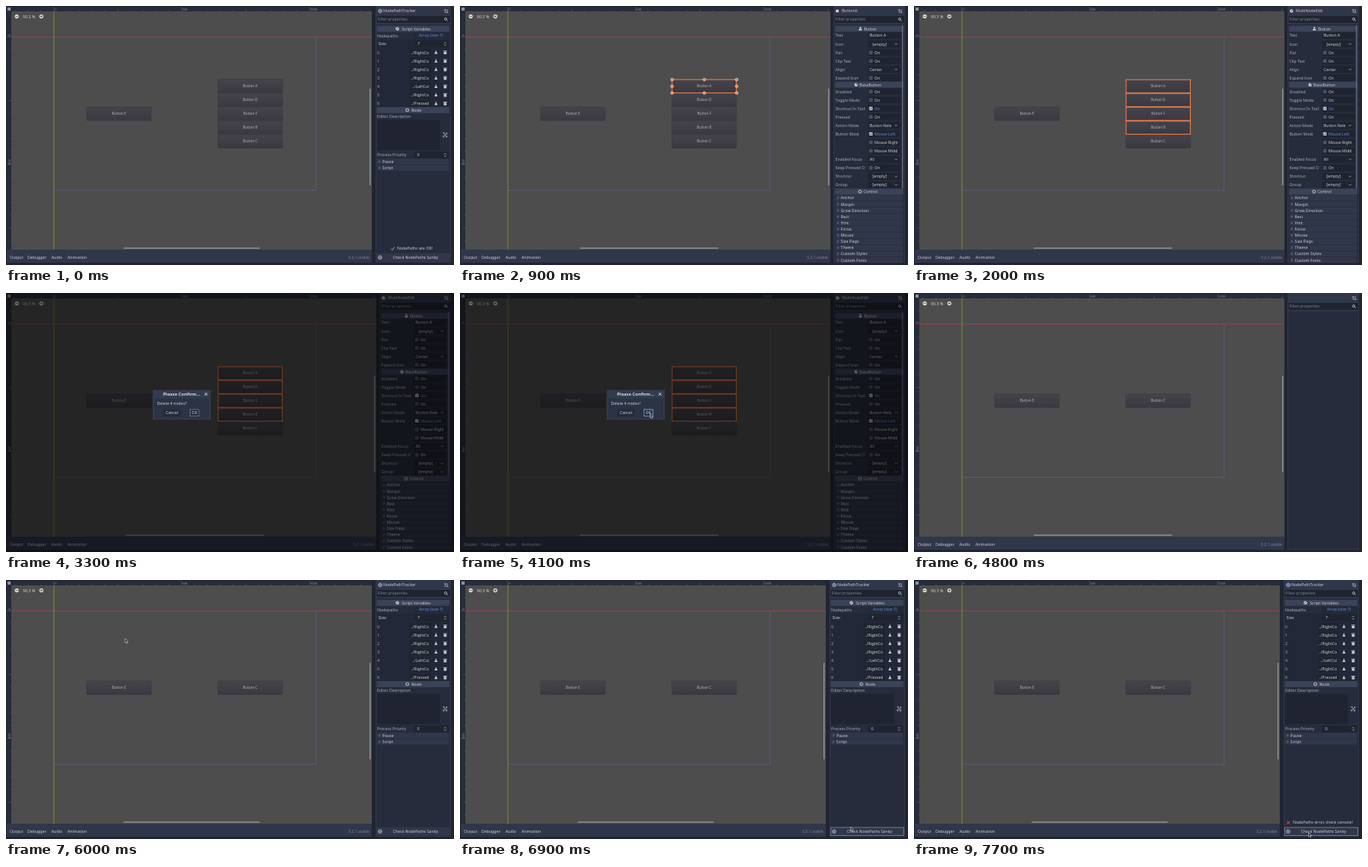
Animation of 583x338 px, one loop 8000 ms. Source, as an HTML page:

```html
<!DOCTYPE html>
<html lang="en">
<head>
<meta charset="utf-8">
<title>Deleting tracked nodes</title>
<style>
html, body { margin: 0; width: 100%; height: 100%; overflow: hidden; background: #202531; }
svg { display: block; width: 583px; height: 338px; }
text { font: 5.2px "Noto Sans", "Open Sans", sans-serif; white-space: pre; }
</style>
</head>
<body>
<svg id="stage" viewBox="0 0 583 338"></svg>
<script>
const BASE = '#30374a', DARK = '#262c3b', DEEP = '#202531', FIELD = '#1f2430';
const FONT = '#c9ccd2', LABEL = '#a9adb6', BLUE = '#5f8fd8', ORANGE = '#f08048';

// Markup helpers; text is placed by its vertical middle.
const rect = (x, y, w, h, fill, extra = '') =>
  `<rect x="${x}" y="${y}" width="${w}" height="${h}" fill="${fill}" ${extra}/>`;
const frame = (x, y, w, h, stroke, width = 1) =>
  rect(x, y, w, h, 'none', `stroke="${stroke}" stroke-width="${width}"`);
const text = (x, y, str, fill = FONT, anchor = 'start', extra = '') =>
  `<text x="${x}" y="${y + 1.9}" fill="${fill}" text-anchor="${anchor}" ${extra}>${str}</text>`;
const line = (d, stroke = FONT, width = 0.8, extra = '') =>
  `<path d="${d}" fill="none" stroke="${stroke}" stroke-width="${width}" ${extra}/>`;
const dot = (x, y, r, fill, extra = '') => `<circle cx="${x}" cy="${y}" r="${r}" fill="${fill}" ${extra}/>`;
const group = (id, body) => `<g id="${id}">${body}</g>`;
const each = (list, fn) => list.map(fn).join('');

const chevron = (x, y) => line(`M${x - .6} ${y - 1.2}l1.2 1.2l-1.2 1.2`, FONT, .6);
const dropArrow = (x, y) => line(`M${x - 1.5} ${y - .7}l1.5 1.5l1.5-1.5`, FONT, .7);
const spinner = (x, y) => line(`M${x - 1.4} ${y - .8}l1.4-1.4l1.4 1.4M${x - 1.4} ${y + .8}l1.4 1.4l1.4-1.4`, FONT, .7);
const globe = (x, y) => dot(x, y, 2.4, 'none', `stroke="${FONT}" stroke-width=".7"`) +
  line(`M${x - 2.4} ${y}h4.8M${x} ${y - 2.4}v4.8`, '#a5b7f3', .7);
const brush = (x, y) => line(`M${x} ${y - 2.3}v2`, FONT, 1) +
  `<path d="M${x - 1} ${y - .5}h2l1 2.5h-4z" fill="${FONT}"/>`;
const trash = (x, y) => rect(x - 2.3, y - 2.2, 4.6, 1, FONT) + rect(x - 1.8, y - .8, 3.6, 3.2, FONT);
const sortIcon = line('M571.6 9V4.3m-1.3 1.3l1.3-1.4l1.3 1.4M574.2 4.3V9m-1.3-1.3l1.3 1.4l1.3-1.4', FONT, .7);

// Main viewport frame; the rulers, scrollbars and footer follow its right edge.
function viewport(right, barX, barW) {
  const step = 16.67;
  let ticks = '';
  for (let i = -3; i < 26; i++) {
    const len = i % 10 == 0 ? 6 : i % 5 == 0 ? 3 : 1.3;
    const x = 62 + i * step, y = 40 + i * step;
    if (x > 7 && x < right) ticks += `M${x} 7v${-len}`;
    if (y > 7 && y < 318) ticks += `M7 ${y}h${-len}`;
  }
  const num = 'style="font-size:4px"';
  return rect(7, 7, right - 7, 311, '#4d4d4d') +
    frame(62.5, 40.5, 341, 200, '#5c5b83', .8) +
    line(`M7 40.5H${right}`, '#a03f4b', .9) + line('M62.3 7V318', '#6f8f2c', 1) +
    rect(1, 1, right - 1, 6, DARK) + rect(1, 1, 6, 317, DARK) +
    line(ticks, '#6b7080', .5) + rect(2, 2, 4, 4, '#8d929e') +
    text(63.2, 3.7, '0', '#9296a0', 'start', num) +
    text(229.5, 3.7, '500', '#9296a0', 'start', num) +
    text(396, 3.7, '1000', '#9296a0', 'start', num) +
    `<g transform="translate(3.7 39.5) rotate(-90)">${text(0, 0, '0', '#9296a0', 'start', num)}</g>` +
    `<g transform="translate(3.7 207) rotate(-90)">${text(0, 0, '500', '#9296a0', 'start', num)}</g>` +
    rect(barX, 315.3, barW, 1.4, '#92949a') + rect(right - 3, 108, 1.4, 126, '#92949a') +
    rect(1, 318, right - 1, 17, BASE) + text(right - 3, 328.3, '3.2.1.stable', '#7d8391', 'end');
}

function dock(x) {
  return rect(x, 0, 579 - x, 335, BASE) + rect(x + 1.5, 13, 95.5 - (x - 481), 9, FIELD) +
    text(x + 2.5, 17.5, 'Filter properties', '#7d828e') +
    dot(572.2, 17, 1.5, 'none', `stroke="${FONT}" stroke-width=".8"`) + line('M573.3 18.1l1.7 1.7') +
    rect(x + 1, 24, 578 - x - 1, 310, DARK) + sortIcon;
}

const heading = (x, y, label, icon) => rect(x, y - 3.9, 577 - x, 7.8, '#3b4358') +
  text(534, y, label, FONT, 'middle') + icon;
const fold = (x, y, label) => rect(x, y - 3.8, 576.5 - x, 7.4, '#30374a') + chevron(x + 3.5, y) + text(x + 7.3, y, label);

function tracker() {
  const paths = ['RightCo', 'RightCo', 'RightCo', 'RightCo', 'LeftCol', 'RightCo', 'Pressed'];
  return dock(481) + globe(487, 6.5) + text(491, 6.5, 'NodePathTracker') +
    heading(482.5, 29.8, 'Script Variables', dot(509.3, 29.7, 2.3, FONT) + line('M508 31l2.5-2.6', DARK)) +
    text(483, 39.3, 'Nodepaths', LABEL) + rect(530.5, 34.6, 46, 8, '#242a39') +
    text(553, 38.5, 'Array (size 7)', BLUE, 'middle') +
    rect(482.5, 43.5, 94.5, 88, '#222837') + text(484.5, 49.3, 'Size:') +
    rect(531, 44.8, 45, 8.6, FIELD) + text(535.5, 49.3, '7') + spinner(571.5, 49.3) +
    each(paths, (p, i) => {
      const y = 60.6 + i * 11.1;
      return rect(525, y - 4.4, 28, 8.8, FIELD) + text(483, y, i, LABEL) +
        text(550.5, y, '../' + p, FONT, 'end') + brush(559.5, y) + trash(571.5, y);
    }) +
    heading(482.5, 135.9, 'Node', dot(522.3, 135.9, 1.9, 'none', `stroke="${FONT}" stroke-width="1"`)) +
    text(483, 144.2, 'Editor Description', LABEL) + rect(483, 148.5, 82, 39.5, FIELD) +
    line('M569 166v-.5h2m2 0h.8v2.2m0 1.4v1.8h-2m-1.4 0H569v-2M569.3 165.7l4.2 5M573.5 165.7l-4.2 5', FONT, .7) +
    text(483, 194.4, 'Process Priority', LABEL) + rect(531, 190, 45.5, 8.8, FIELD) +
    text(535, 194.4, '0') + spinner(571.5, 194.4) +
    fold(482.5, 203, 'Pause') + fold(482.5, 211.3, 'Script') +
    rect(482, 322.5, 96, 11.3, BASE) + globe(486.8, 328.2) +
    text(533, 328.2, 'Check NodePaths Sanity', FONT, 'middle');
}

// Property rows: [y, label, kind, value]
const props = [
  [38.5, 'Text', 'text', 'Button A'], [49.6, 'Icon', 'drop', '[empty]'], [60.7, 'Flat', 'off', 'On'],
  [71.7, 'Clip Text', 'off', 'On'], [82.7, 'Align', 'drop', 'Center'], [93.8, 'Expand Icon', 'off', 'On'],
  [111.6, 'Disabled', 'off', 'On'], [122.6, 'Toggle Mode', 'off', 'On'], [133.7, 'Shortcut In Tool', 'on', 'On'],
  [144.8, 'Pressed', 'off', 'On'], [155.8, 'Action Mode', 'drop', 'Button Rele'], [166.9, 'Button Mask', 'on', 'Mouse Left'],
  [178, '', 'off', 'Mouse Right'], [189, '', 'off', 'Mouse Midd'], [200.2, 'Enabled Focus', 'drop', 'All'],
  [211.3, 'Keep Pressed O', 'off', 'On'], [222.4, 'Shortcut', 'drop', '[empty]'], [233.4, 'Group', 'drop', '[empty]']
];
const folds = ['Anchor', 'Margin', 'Grow Direction', 'Rect', 'Hint', 'Focus', 'Mouse', 'Size Flags', 'Theme', 'Custom Styles', 'Custom Fonts'];

function property([y, label, kind, value]) {
  const drop = kind == 'drop', check = kind == 'on' || kind == 'off', on = kind == 'on';
  const box = check ? rect(532.5, y - 2.2, 4.4, 4.4, on ? FONT : '#596071', 'rx=".6"') +
    (on ? line(`M533.5 ${y}l1 1.1l1.6-2.2`, DARK, .8) : rect(533.2, y - 1.5, 3, 3, '#444b5c')) : '';
  return text(488.5, y, label, LABEL) + rect(531, y - 4.4, 42, 8.8, FIELD) + box +
    text(check ? 539.3 : value == '[empty]' ? 536.5 : 533, y, value, on ? BLUE : FONT) +
    (drop ? dropArrow(567.5, y) : '');
}

const buttonInspector = () => dock(486) + each(props, property) +
  heading(488, 29.7, 'Button', dot(521, 28.4, 1.2, FONT) + rect(519, 30, 4, 1.8, FONT)) +
  heading(488, 102.7, 'BaseButton', dot(515.5, 102.7, 2.2, FONT) + dot(516.2, 102, .8, DARK)) +
  heading(488, 242.2, 'Control', dot(520.5, 242.2, 1.9, 'none', `stroke="${FONT}" stroke-width="1"`)) +
  each(folds, (f, i) => fold(488.3, 250.5 + i * 8.12, f)) +
  rect(575.3, 25, 1.2, 213, '#70778a') + rect(486, 334, 93, 1, BASE);

const gameButton = (x, y, name) => rect(x, y, 84, 17.6, 'url(#face)', 'rx="1" stroke="#393840" stroke-width=".6"') +
  text(x + 42, y + 8.7, 'Button ' + name, '#b4b4b6', 'middle', 'style="font-size:4.6px"');
const rowY = i => 95.8 + i * 18;
const handles = each([[276, 96], [318, 96], [360, 96], [276, 104.8], [360, 104.8], [276, 113.5], [318, 113.5], [360, 113.5]],
  ([x, y]) => dot(x, y, 1.8, ORANGE, 'stroke="#eee" stroke-width=".6"'));

const zoom = dot(14, 13.6, 2.6, '#e0e0e0') + line('M12.6 13.6h2.8', '#444', .9) + text(22, 13.6, '90.3 %', '#d0d0d0') +
  dot(46, 13.6, 2.6, '#e0e0e0') + line('M44.6 13.6h2.8M46 12.2v2.8', '#444', .9);

const dialog = rect(191.5, 127, 74.5, 37.8, '#333b50', 'stroke="#3c455c" stroke-width=".6"') +
  rect(193, 137.5, 71.5, 26, '#2c3345') +
  text(228.5, 132, 'Please Confirm...', '#d5d8de', 'middle', 'style="font-size:5.8px;font-weight:700"') +
  line('M258.5 130.2l3.6 3.6m0-3.6l-3.6 3.6', '#e0e0e0', 1) + text(196.5, 144, 'Delete 4 nodes?') +
  rect(205.5, 152, 21, 8.7, DARK, `stroke="${DEEP}" stroke-width=".5"`) + text(216, 156.4, 'Cancel', FONT, 'middle') +
  rect(239.5, 152, 11.5, 8.7, DARK, 'stroke="#7f8694" stroke-width=".7"') + text(245.2, 156.4, 'OK', FONT, 'middle');

const stage = document.getElementById('stage');
stage.innerHTML =
  `<defs><linearGradient id="face" x2="0" y2="1"><stop stop-color="#45434b"/><stop offset="1" stop-color="#3a3840"/></linearGradient></defs>` +
  rect(0, 0, 583, 338, DEEP) +
  group('narrow', viewport(476, 153, 177)) + group('wide', viewport(482, 156, 180)) +
  zoom + each([[5, 'Output'], [28, 'Debugger'], [59, 'Audio'], [80, 'Animation']], ([x, s]) => text(x, 328.3, s)) +
  gameButton(105, rowY(2), 'E') +
  group('doomed', each([...'ADFB'], (n, i) => gameButton(275.8, rowY(i), n))) +
  group('last', gameButton(275.8, 0, 'C')) +
  group('single', frame(276, 96, 83.6, 17.4, ORANGE, 1.1) + handles) +
  group('multi', each([0, 1, 2, 3], i => frame(276, rowY(i) + .3, 83.6, 17.2, ORANGE, 1.1))) +
  group('tracker', tracker()) +
  group('good', line('M501 316.8l1.6 1.8l3-4', FONT, .8) + text(509, 316.5, 'NodePaths are OK!')) +
  group('bad', line('M485.2 314.6l4 4m0-4l-4 4', '#ff5d5d', 1) + text(493, 316.5, 'NodePaths error, check console!')) +
  group('hover', frame(482.3, 323, 95.4, 10.3, '#8b92a3', .7)) +
  group('empty', dock(486)) + group('button', buttonInspector()) +
  group('titleOne', rect(489, 4.8, 4, 3.4, FONT, 'rx="1"') + text(497, 6.5, 'ButtonA')) +
  group('titleMany', dot(491.3, 6.5, 2.3, FONT) + line('M490.8 7.2l2.2-2.4', BASE) + text(497, 6.5, 'MultiNodeEdit')) +
  group('dim', rect(0, 0, 583, 338, '#000', 'opacity=".52"')) +
  group('dialog', dialog) +
  group('okHover', frame(239.5, 152, 11.5, 8.7, '#6d8fc8', .8) + text(245.2, 156.4, 'OK', BLUE, 'middle')) +
  group('cursor', `<path d="M0 0V5.4L1.2 4.4L2.1 6.3L3.1 5.8L2.3 4H3.9Z" fill="#22252c" stroke="#dedede" stroke-width=".6"/>`);

const parts = Object.fromEntries([...stage.querySelectorAll('g[id]')].map(g => [g.id, g]));
const show = (id, alpha) => {
  parts[id].style.display = alpha ? '' : 'none';
  parts[id].style.opacity = +alpha;
};

// Pointer visits: [time, x, y]; it is outside the stage between them.
const visits = [
  [[3400, 25, 112], [3900, 247.5, 157.5], [4500, 247.5, 157.5], [4700, 40, 112]],
  [[6000, 155, 76.5], [6800, 504, 312], [7000, 511, 328], [7700, 513.5, 329.5], [8000, 513.5, 329.5]]
];
function pointer(t) {
  for (const keys of visits)
    for (let i = 1; i < keys.length; i++) {
      const [t0, x0, y0] = keys[i - 1], [t1, x1, y1] = keys[i];
      if (t < t0 || t > t1) continue;
      const u = (t - t0) / (t1 - t0), k = u * (1.5 - u / 2);
      return [x0 + (x1 - x0) * k, y0 + (y1 - y0) * k];
    }
}

function draw(now) {
  const t = Math.floor(now % 8000 / 100) * 100;
  const within = (a, b) => t >= a && t < b;
  const wide = within(900, 5600), deleted = t >= 4200, modal = within(3300, 4200);
  show('narrow', !wide);
  show('wide', wide);
  show('tracker', !wide);
  show('doomed', !deleted);
  parts.last.setAttribute('transform', `translate(0 ${rowY(deleted ? 2 : 4)})`);
  show('single', within(900, 1800));
  show('titleOne', within(900, 1800));
  show('multi', within(1800, 4200));
  show('titleMany', within(1800, 4200));
  show('button', within(900, 4200));
  show('empty', within(4200, 5600));
  show('good', t < 600 ? 1 : t < 700 ? .4 : 0);
  show('bad', Math.min(1, Math.max(0, (t - 7200) / 300)));
  show('hover', t >= 6900);
  show('dim', modal);
  show('dialog', modal);
  show('okHover', within(3900, 4200));
  const at = pointer(t);
  show('cursor', !!at);
  if (at) parts.cursor.setAttribute('transform', `translate(${at})`);
  requestAnimationFrame(draw);
}
const start = performance.now();
requestAnimationFrame(() => draw(0));
const loop = draw;
draw = now => loop(Math.max(0, now - start));
</script>
</body>
</html>
```
